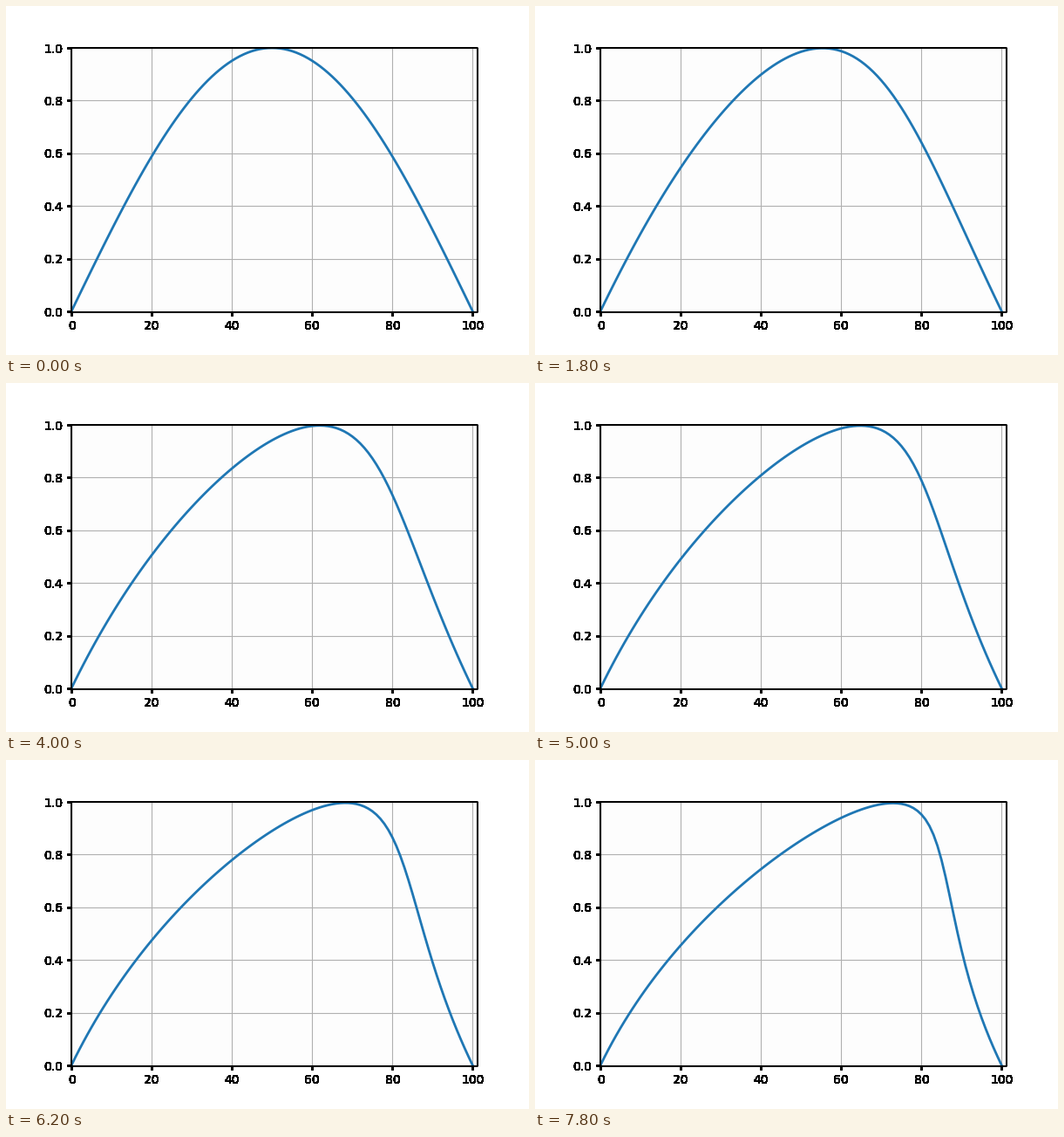
Write a matplotlib script that moves like this. It is 600 by 400 pixels and loops after 8000 ms.

```python
import numpy as np
import matplotlib.pyplot as plt
from matplotlib.animation import FuncAnimation

FRAMES = 40
INTERVAL = 200
COURANT = 0.6


def step(u):
    """One upwind step of u_t + u^2 u_x = 0 with fixed ends."""
    new = u.copy()
    new[1:-1] -= COURANT * u[1:-1] ** 2 * (u[1:-1] - u[:-2])
    return new


x = np.arange(101)
waves = [np.sin(np.pi * x / 100)]
for _ in range(FRAMES - 1):
    waves.append(step(waves[-1]))

fig = plt.figure(figsize=(6, 4), dpi=100, facecolor="white")
ax = fig.add_axes([0.125, 0.125, 0.775, 0.755], facecolor="#fdfdfd")
ax.set_xlim(0, 101)
ax.set_ylim(0, 1)
ax.set_xticks(range(0, 101, 20))
ax.grid(True)

# Repeated drawing hardens the edges of labels, ticks and outer spines.
fig.canvas.draw()
renderer = fig.canvas.get_renderer()
for _ in range(60):
    ax.draw(renderer)
fig.figimage(np.array(fig.canvas.buffer_rgba()), zorder=-1)

line, = ax.plot(x, waves[0], color="#1f77b4", lw=2)


def update(i):
    line.set_ydata(waves[i])
    return line,


anim = FuncAnimation(fig, update, frames=FRAMES, interval=INTERVAL,
                     repeat=True, repeat_delay=0)
plt.show()
```
